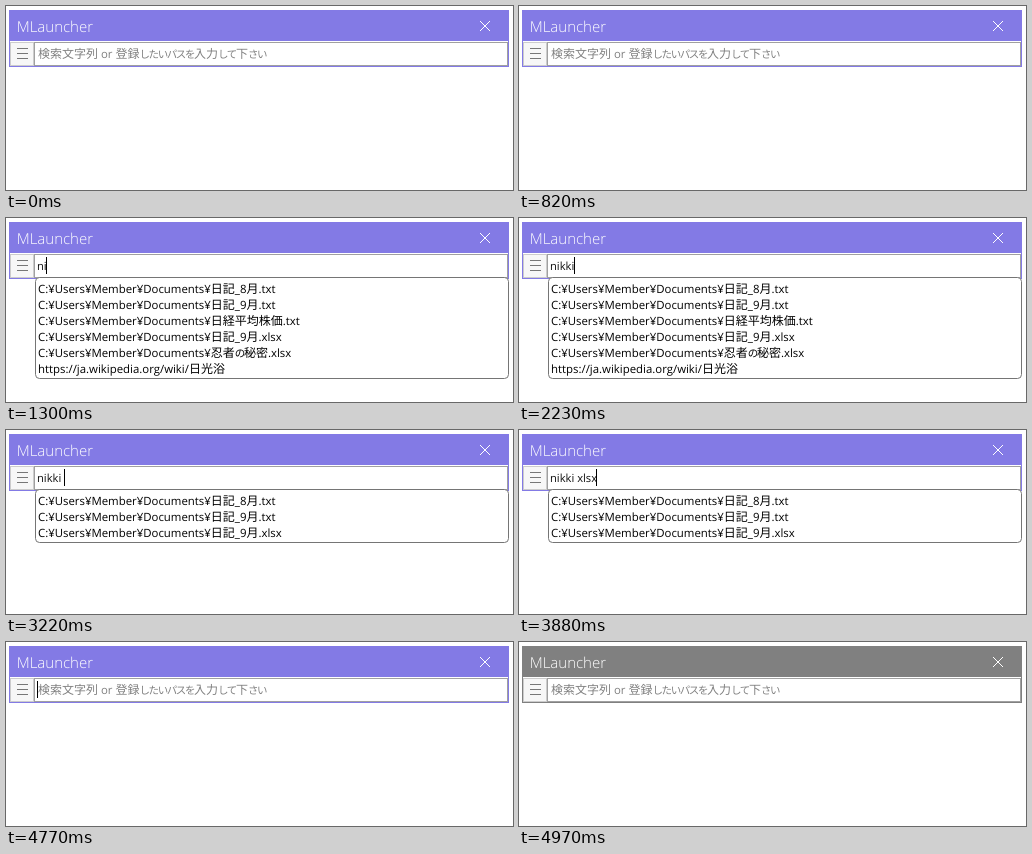
Animation, 507 px wide and 184 px high, one loop 6160 ms. Source, as an HTML page with a canvas:

```html
<!DOCTYPE html>
<html lang="ja">
<head>
<meta charset="utf-8">
<title>MLauncher</title>
<style>
html, body { margin: 0; width: 100%; height: 100%; overflow: hidden; background: #fff; }
canvas { display: block; }
</style>
</head>
<body>
<canvas id="stage" width="507" height="184"></canvas>
<script>
const ctx = document.getElementById('stage').getContext('2d', { alpha: false });
const LOOP = 6160;
const BLUR_AT = 4970;
const LATIN = '"Open Sans", "Noto Sans", sans-serif';
const CJK = '"Noto Sans CJK JP", "Noto Sans CJK", sans-serif';
const HINT = '検索文字列 or 登録したいパスを入力して下さい';

const docs = 'C:¥Users¥Member¥Documents¥';
const aug = docs + '日記_8月.txt';
const sep = docs + '日記_9月.txt';
const sheet = docs + '日記_9月.xlsx';
const all = [aug, sep, docs + '日経平均株価.txt', sheet,
  docs + '忍者の秘密.xlsx', 'https://ja.wikipedia.org/wiki/日光浴'];

// [time, typed text, caret x or 0 when hidden]
const typing = [
  [0, '', 0], [270, '', 31], [820, '', 0], [890, 'n', 37],
  [1160, 'ni', 40], [1370, 'ni', 0], [1830, 'nik', 46], [1960, 'nikk', 52],
  [2230, 'nikki', 55], [2760, 'nikki', 0], [3220, 'nikki ', 58],
  [3480, 'nikki x', 64], [3550, 'nikki xl', 67], [3680, 'nikki xls', 72],
  [3880, 'nikki xlsx', 77], [4500, 'nikki xlsx', 0],
  [4700, '', 0], [4770, '', 31], [BLUR_AT, '', 0]
];

// [time, rows, pixels still hidden above the popup's edge]
const results = [
  [0, [], 0], [1160, all, 31], [1230, all, 10], [1300, all, 0],
  [2490, [aug, sep, sheet], 0], [4150, [sheet], 0], [4700, [], 0]
];

const latest = (list, t) => list.filter(step => step[0] <= t).pop();

function rect(x, y, w, h, color) {
  ctx.fillStyle = color;
  ctx.fillRect(x, y, w, h);
}

function box(x, y, w, h, border, fill) {
  rect(x, y, w, h, border);
  rect(x + 1, y + 1, w - 2, h - 2, fill);
}

// Draws mixed text, with kana set narrower than kanji.
function drawText(text, x, y, color, latinSize = 11.4) {
  ctx.fillStyle = color;
  ctx.textRendering = 'geometricPrecision';
  for (const run of text.match(/[ぁ-ヿ]+|[一-龥]+|[^ぁ-ヿ一-龥]+/g) || []) {
    const kana = /[ぁ-ヿ]/.test(run);
    const kanji = /[一-龥]/.test(run);
    ctx.font = kana ? `10.5px ${CJK}` : kanji ? `12px ${CJK}` : `${latinSize}px ${LATIN}`;
    ctx.letterSpacing = kana ? '-1.4px' : '0px';
    ctx.fillText(run, x, y);
    x += ctx.measureText(run).width;
  }
  ctx.letterSpacing = '0px';
}

function drawWindow(active) {
  const accent = active ? '#837ae5' : '#808080';
  box(3, 4, 500, 57, accent, '#fff');
  rect(3, 4, 500, 31, accent);

  ctx.fillStyle = '#fff';
  ctx.textRendering = 'geometricPrecision';
  ctx.font = `300 15px ${LATIN}`;
  ctx.fillText('MLauncher', 10.7, 26);

  ctx.strokeStyle = '#fff';
  ctx.lineWidth = 1;
  ctx.beginPath();
  ctx.moveTo(474, 15);
  ctx.lineTo(484, 25);
  ctx.moveTo(484, 15);
  ctx.lineTo(474, 25);
  ctx.stroke();

  box(4, 36, 24, 24, '#ccc', '#f7f7f7');
  for (const y of [42, 47, 52]) rect(11, y, 11, 1, '#777');
  box(28, 36, 474, 24, '#a0a0a0', '#fff');
}

function drawInput(text, caret) {
  if (text) drawText(text, 31, 52, '#111', 11.2);
  else drawText(HINT, 32, 52, '#808080');
  if (caret) rect(caret, 39, 1, 17, '#000');
}

function drawPopup(rows, hidden) {
  if (!rows.length) return;
  const height = Math.max(25, rows.length * 16 + 6);
  ctx.save();
  ctx.beginPath();
  ctx.rect(29, 59, 474, 125);
  ctx.clip();
  ctx.translate(0, -hidden);
  ctx.beginPath();
  ctx.roundRect(29.5, 59.5, 473, height - 1, 4);
  ctx.fillStyle = '#fff';
  ctx.fill();
  ctx.strokeStyle = '#757575';
  ctx.lineWidth = 1;
  ctx.stroke();
  rows.forEach((row, i) => drawText(row, 32, 75 + i * 16, '#000'));
  ctx.restore();
}

function frame() {
  const t = performance.now() % LOOP;
  const [, text, caret] = latest(typing, t);
  const [, rows, hidden] = latest(results, t);
  rect(0, 0, 507, 184, '#fff');
  drawWindow(t < BLUR_AT);
  drawInput(text, caret);
  drawPopup(rows, hidden);
  requestAnimationFrame(frame);
}

frame();
</script>
</body>
</html>
```
